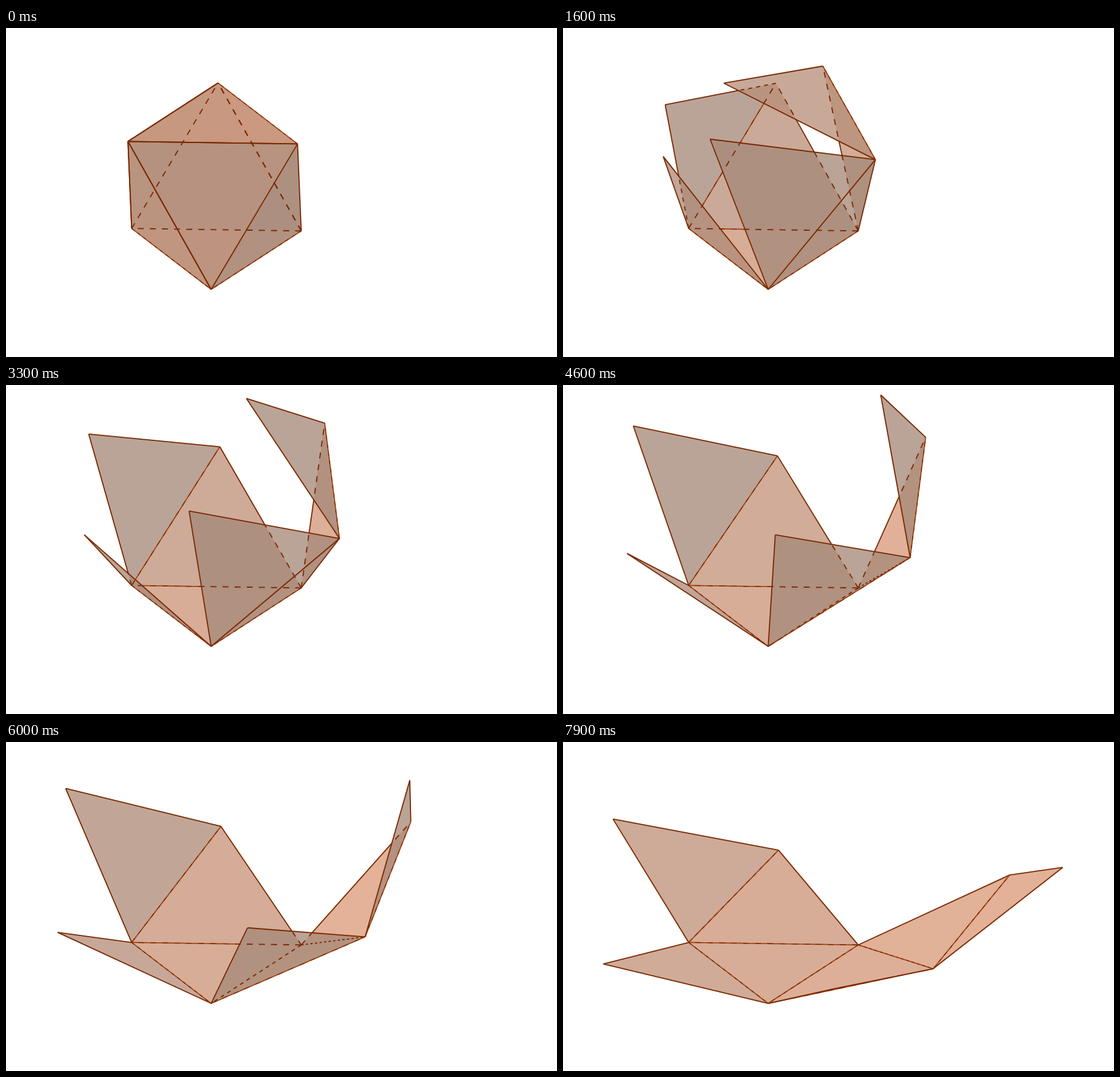
Animation of 887 by 529 pixels, one loop 8 s. Source, as an HTML page with a canvas:

```html
<!DOCTYPE html>
<html lang="en">
<head>
<meta charset="utf-8">
<title>Unfolding octahedron</title>
<style>
html, body { margin: 0; width: 100%; height: 100%; overflow: hidden; background: #fff; }
canvas { display: block; width: 100vw; height: 100vh; }
</style>
</head>
<body>
<canvas id="stage" width="887" height="529"></canvas>
<script>
const ctx = document.getElementById('stage').getContext('2d');
const LOOP = 8000, STEP = 100, STEPS_TO_FLAT = 100;
const CENTER = [335.8, 254.3];
const FOLD = Math.acos(1 / 3);
const AMBIENT = 0.285, DIFFUSE = 0.355, ALPHA = 0.767;
const LIGHT = [-0.707, -0.647, 0.287];
const DARK = '#7a2900', WARM = '#a23f0a', DEEP = '#6b2500';
const PIECES = 280, DASHES = 14;

// Space axes: x right, y down, z towards the viewer.
const front = [-5.5, 166, 98.9];
const right = [139.5, 72, -112.8];
const left = [-133.5, 68, -121.9];

const add = (a, b, k = 1) => a.map((v, i) => v + b[i] * k);
const scale = (a, k) => a.map(v => v * k);
const dot = (a, b) => a[0] * b[0] + a[1] * b[1] + a[2] * b[2];
const mix = (a, b, t) => a.map((v, i) => v + (b[i] - v) * t);
const len = a => Math.sqrt(dot(a, a));
const unit = a => scale(a, 1 / len(a));
const cross2 = (a, b, p) => (b[0] - a[0]) * (p[1] - a[1]) - (b[1] - a[1]) * (p[0] - a[0]);

// Hinges a new face onto edge a-b of its parent, bent inwards by the angle.
function hinge(parent, a, b, bend) {
  const c = parent.pts.find(p => p !== a && p !== b);
  const mid = mix(a, b, 0.5);
  const arm = add(mid, c, -1), h = len(arm), u = scale(arm, 1 / h);
  const cos = Math.cos(bend), sin = Math.sin(bend);
  const tip = add(add(mid, u, h * cos), parent.normal, h * sin);
  const normal = add(scale(parent.normal, cos), u, -sin);
  return { pts: [a, b, tip], normal, tip, valley: parent.normal[2] > 0 };
}

function buildNet(bend) {
  const base = {
    pts: [front, right, left],
    normal: unit(scale(add(add(front, right), left), -1))
  };
  const fr = hinge(base, front, right, bend);
  const fl = hinge(base, front, left, bend);
  const back = hinge(base, left, right, bend);
  const flap = hinge(fr, front, fr.tip, bend);
  const wing = hinge(back, left, back.tip, bend);
  const side = hinge(fr, right, fr.tip, bend);
  const end = hinge(side, fr.tip, side.tip, bend);
  const faces = [base, fr, fl, back, flap, wing, side, end];

  const edges = [[front, right, true], [front, left, true], [left, right, true]];
  for (const f of faces.slice(1)) {
    for (const p of f.pts.slice(0, 2)) {
      const child = faces.find(g => g.tip !== f.tip && g.valley &&
        g.pts[0] === p && g.pts[1] === f.tip);
      edges.push([f.tip, p, !!child]);
    }
  }
  return { faces, edges };
}

function depthAt(face, p) {
  const n = face.normal, a = face.pts[0];
  const nz = Math.abs(n[2]) < 1e-4 ? 1e-4 : n[2];
  return a[2] - (n[0] * (p[0] - a[0]) + n[1] * (p[1] - a[1])) / nz;
}

function contains(face, p) {
  const [a, b, c] = face.pts, area = cross2(a, b, c);
  if (Math.abs(area) < 20) return false;
  return [cross2(a, b, p), cross2(b, c, p), cross2(c, a, p)].every(v => v / area > 0.003);
}

// Projected overlap of two triangles: its centre, or null when negligible.
function overlap(f, g) {
  const sign = Math.sign(cross2(...g.pts));
  let poly = f.pts.map(p => [p[0], p[1]]);
  for (let i = 0; i < 3 && poly.length; i++) {
    const a = g.pts[i], b = g.pts[(i + 1) % 3], out = [];
    poly.forEach((p, j) => {
      const q = poly[(j + 1) % poly.length];
      const dp = sign * cross2(a, b, p), dq = sign * cross2(a, b, q);
      if (dp >= 0) out.push(p);
      if (dp * dq < 0) out.push(mix(p, q, dp / (dp - dq)));
    });
    poly = out;
  }
  if (poly.length < 3) return null;
  let area = 0;
  for (let i = 1; i < poly.length - 1; i++) area += cross2(poly[0], poly[i], poly[i + 1]);
  if (Math.abs(area) < 4) return null;
  return scale(poly.reduce((s, p) => add(s, p), [0, 0]), 1 / poly.length);
}

function isBehind(f, g) {
  const p = overlap(f, g);
  return p !== null && depthAt(f, p) < depthAt(g, p) - 0.01;
}

function backToFront(faces) {
  const rest = faces.slice(), sorted = [];
  while (rest.length) {
    const i = rest.findIndex(f => !rest.some(g => g !== f && isBehind(g, f)));
    sorted.push(rest.splice(Math.max(i, 0), 1)[0]);
  }
  return sorted;
}

function fillFace(face) {
  const facing = face.normal[2] < 0 ? -1 : 1;
  const lit = AMBIENT + DIFFUSE * Math.max(0, facing * dot(face.normal, LIGHT));
  ctx.fillStyle = `rgba(${122 + 153 * lit}, ${122 + 51 * lit}, 121, ${ALPHA})`;
  ctx.beginPath();
  face.pts.forEach(p => ctx.lineTo(p[0], p[1]));
  ctx.fill();
}

function line(a, b, color, width) {
  ctx.strokeStyle = color;
  ctx.lineWidth = width;
  ctx.beginPath();
  ctx.moveTo(a[0], a[1]);
  ctx.lineTo(b[0], b[1]);
  ctx.stroke();
}

function drawEdge([a, b, valley], faces) {
  const others = faces.filter(f => !(f.pts.includes(a) && f.pts.includes(b)));
  const styleAt = t => {
    const p = mix(a, b, t);
    const hidden = others.some(f => contains(f, p) && depthAt(f, p) > p[2] + 1.5);
    const dash = (t * DASHES) % 1 >= 0.5;
    if (hidden) return dash ? 'dark' : 'none';
    return valley ? (dash ? 'mixed' : 'warm') : 'dark';
  };
  let from = 0, style = styleAt(0.5 / PIECES);
  for (let i = 1; i <= PIECES; i++) {
    const next = i < PIECES ? styleAt((i + 0.5) / PIECES) : '';
    if (next === style) continue;
    const p = mix(a, b, from / PIECES), q = mix(a, b, i / PIECES);
    if (style === 'dark') line(p, q, DARK, 1.8);
    if (style === 'warm' || style === 'mixed') line(p, q, WARM, 1.7);
    if (style === 'mixed') line(p, q, DEEP, 1.1);
    from = i;
    style = next;
  }
}

function draw(now) {
  const step = Math.max(0, Math.floor((now % LOOP) / STEP) - 1);
  const { faces, edges } = buildNet(FOLD * (1 - step / STEPS_TO_FLAT));
  ctx.setTransform(1, 0, 0, 1, 0, 0);
  ctx.fillStyle = '#fff';
  ctx.fillRect(0, 0, 887, 529);
  ctx.translate(...CENTER);
  backToFront(faces).forEach(fillFace);
  edges.forEach(e => drawEdge(e, faces));
  requestAnimationFrame(tick);
}

let start = null;
function tick(now) {
  if (start === null) start = now;
  draw(now - start);
}
requestAnimationFrame(tick);
</script>
</body>
</html>
```
